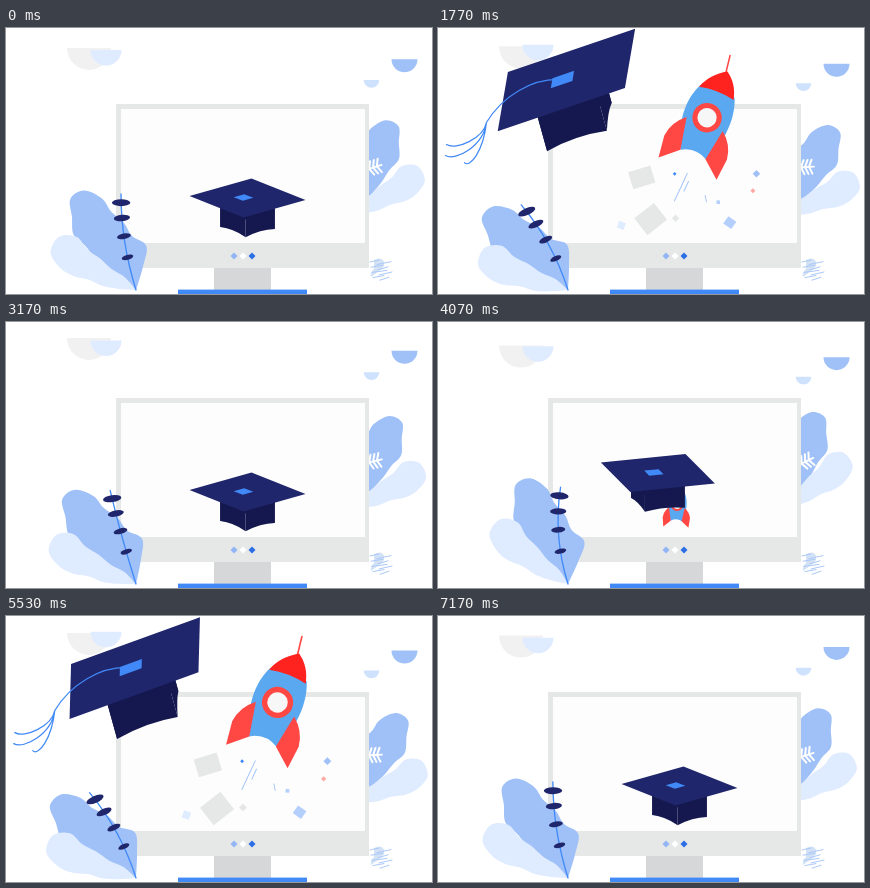
These frames come from a looping animation (426x266 px, 7.21 s). An HTML page:

```html
<!DOCTYPE html>
<html lang="en">
<head>
<meta charset="utf-8">
<title>Graduation launch</title>
<style>
html, body { margin: 0; width: 100%; height: 100%; overflow: hidden; background: #fff; }
svg { display: block; width: 100vw; height: 100vh; }
</style>
</head>
<body>
<svg id="stage" viewBox="0 0 426 266"></svg>
<script>
const CYCLE = 3605;
const stage = document.getElementById('stage');
const NAVY = '#20266b', DARK = '#14184e', BLUE = '#4089f7', MID = '#9fc1f8', PALE = '#dfebff';
const RED = '#ff4744', GREY = '#e6e8e8', PAPER = '#e6e7e7';

function set(node, attrs) {
  for (const key in attrs) node.setAttribute(key, attrs[key]);
  return node;
}
function add(tag, attrs, parent = stage) {
  return parent.appendChild(set(document.createElementNS('http://www.w3.org/2000/svg', tag), attrs));
}
const path = (d, fill, parent) => add('path', { d, fill }, parent);
const line = (d, stroke, width, parent) =>
  add('path', { d, stroke, 'stroke-width': width, fill: 'none', 'stroke-linecap': 'round' }, parent);
const rect = (x, y, width, height, fill) => add('rect', { x, y, width, height, fill });

// Smooth keyframe track without overshoot: rows of [time, ...values]
function track(...rows) {
  const last = rows.length - 1;
  const rate = (i, k) => (rows[i + 1][k] - rows[i][k]) / (rows[i + 1][0] - rows[i][0]);
  const slope = (i, k) => {
    if (i === 0 || i === last) return 0;
    const a = rate(i - 1, k), b = rate(i, k);
    return a * b > 0 ? 2 * a * b / (a + b) : 0;
  };
  return t => {
    let i = 0;
    while (i < last - 1 && t >= rows[i + 1][0]) i++;
    const from = rows[i], to = rows[i + 1], span = to[0] - from[0];
    const u = Math.max(0, Math.min(1, (t - from[0]) / span)), v = 1 - u;
    return from.slice(1).map((p, j) => {
      const k = j + 1;
      return v * v * (1 + 2 * u) * p + u * u * (3 - 2 * u) * to[k]
        + span * u * v * (v * slope(i, k) - u * slope(i + 1, k));
    });
  };
}

// The cap and the rocket share one rhythm: rest, peek, rise, fly, hover, back to rest
const flight = ([rest, peek, rise, fly, hover]) => track(
  [0, ...rest], [200, ...rest], [465, ...peek], [1000, ...rise], [1325, ...fly],
  [2530, ...hover], [3030, ...rest], [CYCLE, ...rest]);

// Closed smooth curve with a sharp first point
function blob(points) {
  const n = points.length;
  const at = i => points[Math.max(0, Math.min(n, i)) % n];
  return 'M' + points[0] + points.map((b, i) => {
    const a = at(i - 1), c = at(i + 1), e = at(i + 2);
    return `C${b.map((v, k) => v + (c[k] - a[k]) / 6)} ${c.map((v, k) => v - (e[k] - b[k]) / 6)} ${c}`;
  }).join('') + 'Z';
}

// Lobed leaf pointing up from the origin, given by its half widths at even steps
function leafShape(step, right, left) {
  const side = (widths, sign) => widths.map((w, i) => [sign * w, -step * (i + 1)]);
  return blob([[0, 0], ...side(right, 1), ...side(left, -1).reverse()]);
}
const TALL = leafShape(16, [18, 32, 25, 25, 20, 19, 8], [9, 14, 18, 20, 24, 16, 8]);
const BROAD = leafShape(15.5, [6, 7, 11, 13, 19, 11], [7, 12, 13, 17, 16, 7]);

// Floating half discs: x, radius, middle height, swing, peak time
const clouds = [
  [83, 22, 19, 5.5, 800, '#f1f1f1'],
  [100, 15.5, 19.3, 5, 560, PALE],
  [398.5, 13, 33.4, 5, 1160, MID],
  [365.5, 7.8, 53.6, 3.5, 1160, '#cfe2fd']
].map(([x, r, y, swing, peak, fill]) => ({
  y, swing, peak, node: path(`M${x - r} 0A${r} ${r} 0 0 0 ${x + r} 0Z`, fill)
}));

// Bush behind the monitor: the front plant's leaves, mirrored
const bush = add('g', { transform: 'translate(342 186) scale(-0.9 0.9)' });
const bushTall = path(TALL, MID, bush);
const bushBroad = path(BROAD, PALE, bush);
const bone = add('g', {});
line('M361 139H376', '#fff', 1.8, bone);
for (let x = 363; x < 375; x += 4) line(`M${x} 139l3 -7M${x} 139l3 7`, '#fff', 2, bone);

// Scribbled shadow
path('M368 232q8 -4 10 2q1 6 -5 9l-8 6q-1 -5 3 -8Z', '#d3e2f5');
for (let i = 0; i < 8; i++) {
  line(`M${364 + (i * 7) % 13} ${234 + i * 2.6}l${9 + (i * 5) % 7} ${-2 - i % 2}`, '#abc9f8', 1);
}

// Monitor
rect(110, 76, 253, 164, GREY);
rect(115, 81, 244, 134, '#fdfdfd');
rect(208, 240, 57, 22, '#d6d7d8');
rect(172, 261.6, 129, 4.4, BLUE);
['#92b5f7', '#fff', '#2c6ee4'].forEach((fill, i) =>
  path(`M${228 + 9 * i} 224.5l3.5 3.5l-3.5 3.5l-3.5 -3.5Z`, fill));

// Debris blown out below the rocket: end position, width, height, tilt
const NOZZLE = [250, 160];
const debris = [
  [198, 148, 26, 20, -17, PAPER],
  [208, 195, 28, 24, -38, PAPER],
  [236, 194, 6, 6, 45, PAPER],
  [327, 144, 6, 6, 45, MID],
  [323, 163, 4, 4, 45, '#ffa9a7'],
  [297, 199, 11, 10, 35, '#b4cffb'],
  [284, 176, 4, 4, 5, '#b4cffb'],
  [175, 202, 8, 8, 20, PALE],
  [235, 144, 3, 3, 45, BLUE],
  [242, 159, 1, 35, 25, MID],
  [248, 158, 1, 13, 25, MID],
  [270, 172, 1, 8, -12, MID]
].map(([x, y, w, h, tilt, fill]) => ({
  x, y, tilt, node: add('rect', { x: -w / 2, y: -h / 2, width: w, height: h, fill })
}));
const burstAt = track([700, 0], [1000, 0.4], [1325, 0.75], [2530, 1], [2830, 0]);

// Rocket, centred on its window
const rocket = add('g', {});
line('M2 -56L-1 -79', RED, 1.8, rocket);
path('M-21 -34C-33 -12 -30 20 -16 47Q0 37 17 47C30 20 32 -12 22 -34Z', '#5aa8f0', rocket);
path('M3 -60C-9 -53 -18 -43 -22 -31Q0 -36 22 -31C19 -44 13 -53 3 -60Z', '#ff2320', rocket);
for (const side of [-1, 1]) {
  set(path('M23 8Q38 20 40 38L37 65L16 47Z', RED, rocket), { transform: `scale(${side} 1)` });
}
add('circle', { r: 17.5, fill: RED }, rocket);
add('circle', { r: 11.5, fill: '#f7f7f7' }, rocket);

// x, y, scale, angle
const rocketAt = flight([
  [240, 187, 0.1, 0], [239, 183, 0.34, 3], [257, 121, 0.57, 9], [262, 101, 0.69, 21], [277, 80, 1, 21]
]);

// Board centre, its two half diagonals, and how far the cap has opened up
const capAt = flight([
  [241.5, 170, 58, 2, -4, 19.5, 0],
  [220, 151, 57, 10.5, -27.5, 19, 0],
  [139, 63, 62, 7, -56, 46, 0.9],
  [128, 52, 50, 14.5, -73.5, 51.5, 1],
  [131, 52.5, 77.5, -6.5, -46, 49.5, 1]
]);
const crown = Array.from({ length: 4 }, () => path('', DARK));
const board = path('', NAVY);
const button = path('', BLUE);
const tassel = line('', BLUE, 1.2);

// Plant in front
const BASE = [130, 262];
const plant = add('g', { transform: `translate(${BASE})` });
const plantTall = path(TALL, MID, plant);
const plantBroad = path(BROAD, PALE, plant);
const stem = line('', BLUE, 1.3);
const stemLeaves = [0.09, 0.25, 0.44, 0.66].map((along, i) => ({
  along, tilt: -5 * i, node: add('ellipse', { rx: 9.2 - 1.1 * i, ry: 3.5 - 0.35 * i, fill: NAVY })
}));

// Angles of tall leaf, broad leaf and stem
const swayAt = track(
  [0, 0, 0, 0], [465, 8, 9, 4.5], [900, -14.5, -9.2, -20.5],
  [2530, -14, -6.2, -18.5], [3000, -8, -4.5, -10], [CYCLE, 0, 0, 0]);

// Point on the stem, from its tip (0) to its foot (1); it bends more towards the tip
function stemPoint(along, angle) {
  const dx = 15 * (along * along - 1), dy = 96 * (along - 1);
  const turn = angle * (1 - along), a = turn * Math.PI / 180;
  return {
    x: BASE[0] + dx * Math.cos(a) - dy * Math.sin(a),
    y: BASE[1] + dx * Math.sin(a) + dy * Math.cos(a),
    turn
  };
}

function drawCap(t) {
  const [x, y, ux, uy, vx, vy, open] = capAt(t);
  const drop = [13 * open, 30 + 17 * open];
  const corners = (cx, cy, size) => [[-1, 0], [0, -1], [1, 0], [0, 1]].map(([i, j]) =>
    [cx + size * (i * ux + j * vx), cy + size * (i * uy + j * vy)]);
  const polygon = points => 'M' + points.join('L') + 'Z';
  const bx = x - 4, by = y - 0.5;
  set(board, { d: polygon(corners(x, y, 1)) });
  set(button, { d: polygon(corners(bx, by, 0.17)) });

  const top = corners(x, y, 0.47);
  const low = corners(x + drop[0], y + drop[1], 0.47);
  crown.forEach((face, i) => {
    const j = (i + 1) % 4;
    const hem = [0, 1].map(k => (low[i][k] + low[j][k]) / 2 - 0.12 * drop[k]);
    set(face, { d: `M${top[i]}L${low[i]}Q${hem} ${low[j]}L${top[j]}Z` });
  });

  const dx = -76 * open, dy = 43 * open ** 3;
  let cord = `M${bx} ${by}c${dx * 0.4} ${-2 * open} ${dx * 0.8} ${dy * 0.4} ${dx} ${dy}`;
  for (const [sx, sy] of [[-40, 22], [-41, 33], [-22, 40]]) {
    const [ex, ey] = [sx * open, sy * open];
    cord += `M${bx + dx} ${by + dy}c${-3 * open} ${ey * 0.7} ${ex * 0.75} ${ey + 6 * open} ${ex} ${ey}`;
  }
  set(tassel, { d: cord, opacity: Math.min(1, open * 4) });
}

function drawPlants(t) {
  const [tall, broad, stalk] = swayAt(t);
  const turn = (node, angle) => set(node, { transform: `rotate(${angle})` });
  turn(plantTall, tall - 31.7);
  turn(plantBroad, broad - 62);
  turn(bushTall, tall * 0.45 - 26);
  turn(bushBroad, broad * 0.7 - 62);
  set(bone, { transform: `rotate(${-18 - tall} 369 139)` });

  const points = Array.from({ length: 9 }, (_, i) => stemPoint(i / 8, stalk));
  set(stem, { d: 'M' + points.map(p => p.x + ' ' + p.y).join('L') });
  for (const { along, tilt, node } of stemLeaves) {
    const p = stemPoint(along, stalk);
    set(node, { transform: `translate(${p.x} ${p.y}) rotate(${tilt + p.turn * 1.3})` });
  }
}

function draw(t) {
  for (const { y, swing, peak, node } of clouds) {
    set(node, { transform: `translate(0 ${y + swing * Math.cos((t - peak) / CYCLE * 2 * Math.PI)})` });
  }
  const [burst] = burstAt(t);
  for (const { x, y, tilt, node } of debris) {
    const px = NOZZLE[0] + (x - NOZZLE[0]) * burst, py = NOZZLE[1] + (y - NOZZLE[1]) * burst;
    set(node, { transform: `translate(${px} ${py}) rotate(${tilt}) scale(${burst})` });
  }
  const [x, y, scale, angle] = rocketAt(t);
  set(rocket, { transform: `translate(${x} ${y}) rotate(${angle}) scale(${scale})` });
  drawCap(t);
  drawPlants(t);
}

const start = performance.now();
function frame() {
  draw((performance.now() - start) % CYCLE);
  requestAnimationFrame(frame);
}
frame();
</script>
</body>
</html>
```
